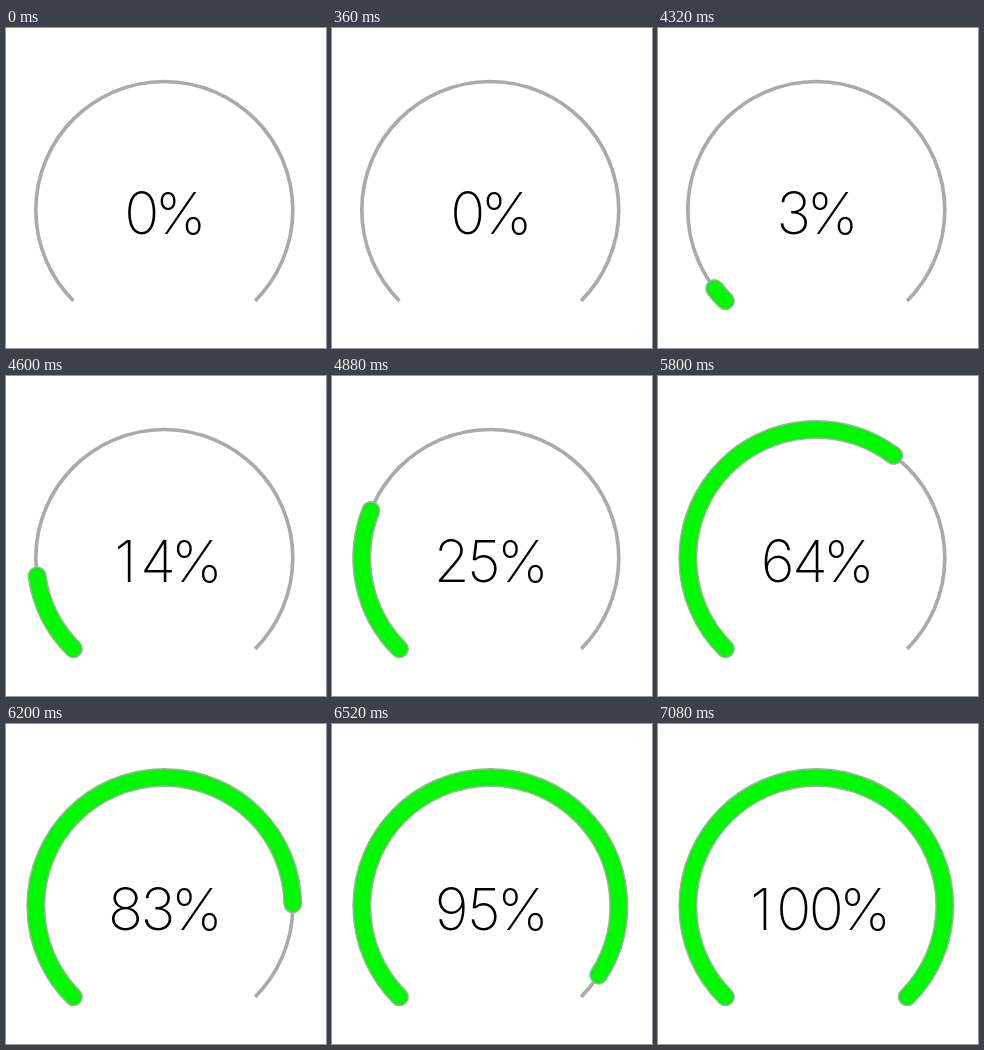
These frames come from a looping animation (320x320 px, 8000 ms). An HTML page with a canvas:

```html
<!DOCTYPE html>
<html lang="en">
<head>
<meta charset="utf-8">
<title>Progress gauge</title>
<style>
  html, body { margin: 0; width: 100%; height: 100%; overflow: hidden; background: #fff; }
  canvas, svg { position: absolute; left: 0; top: 0; width: 320px; height: 320px; }
  text {
    font: 200 58px Inter, Roboto, sans-serif;
    text-anchor: middle;
    fill: #000;
  }
</style>
</head>
<body>
<canvas></canvas>
<svg viewBox="0 0 320 320"><text y="206"></text></svg>
<script>
const LOOP = 8000, STEP = 40;
const CX = 158.3, CY = 182, RADIUS = 128.5;
const START = Math.PI * 0.75, SWEEP = Math.PI * 1.5;
const GREY = '#aaa', GREEN = '#00f900';
const DIGIT = 32.5, SIGN = 45;

// [time in ms, percent]; the gauge jumps from zero at the first key
const keys = [[4320, 2.7], [4880, 24.7], [5120, 38], [5400, 48], [5960, 70], [6200, 83], [6640, 100]];

const canvas = document.querySelector('canvas');
const label = document.querySelector('text');
const ctx = canvas.getContext('2d');
const scale = window.devicePixelRatio || 1;
canvas.width = canvas.height = 320 * scale;
ctx.scale(scale, scale);

function percentAt(time) {
  if (time < keys[0][0]) return 0;
  const next = keys.findIndex(key => key[0] > time);
  if (next < 0) return 100;
  const [t0, p0] = keys[next - 1], [t1, p1] = keys[next];
  return p0 + (p1 - p0) * (time - t0) / (t1 - t0);
}

function arc(percent, width, color, cap) {
  ctx.beginPath();
  ctx.arc(CX, CY, RADIUS, START, START + SWEEP * percent / 100);
  ctx.lineWidth = width;
  ctx.strokeStyle = color;
  ctx.lineCap = cap;
  ctx.stroke();
}

// Centres each digit in an equal cell, followed by the percent sign
function write(words) {
  if (label.textContent === words) return;
  const digits = words.length - 1;
  const left = CX - (digits * DIGIT + SIGN) / 2;
  const centres = [...words].map((char, i) =>
    left + i * DIGIT + (char === '%' ? SIGN : DIGIT) / 2);
  label.setAttribute('x', centres.join(' '));
  label.textContent = words;
}

function draw(now) {
  const time = Math.floor(now % LOOP / STEP) * STEP;
  const percent = percentAt(time);
  ctx.clearRect(0, 0, 320, 320);
  arc(100, 3.6, GREY, 'butt');
  if (percent > 0) {
    arc(percent, 19, GREY, 'round');
    arc(percent, 16.2, GREEN, 'round');
  }
  write(Math.round(percent) + '%');
}

let origin;
function tick(now) {
  origin ??= now;
  draw(now - origin);
  requestAnimationFrame(tick);
}
draw(0);
requestAnimationFrame(tick);
</script>
</body>
</html>
```
